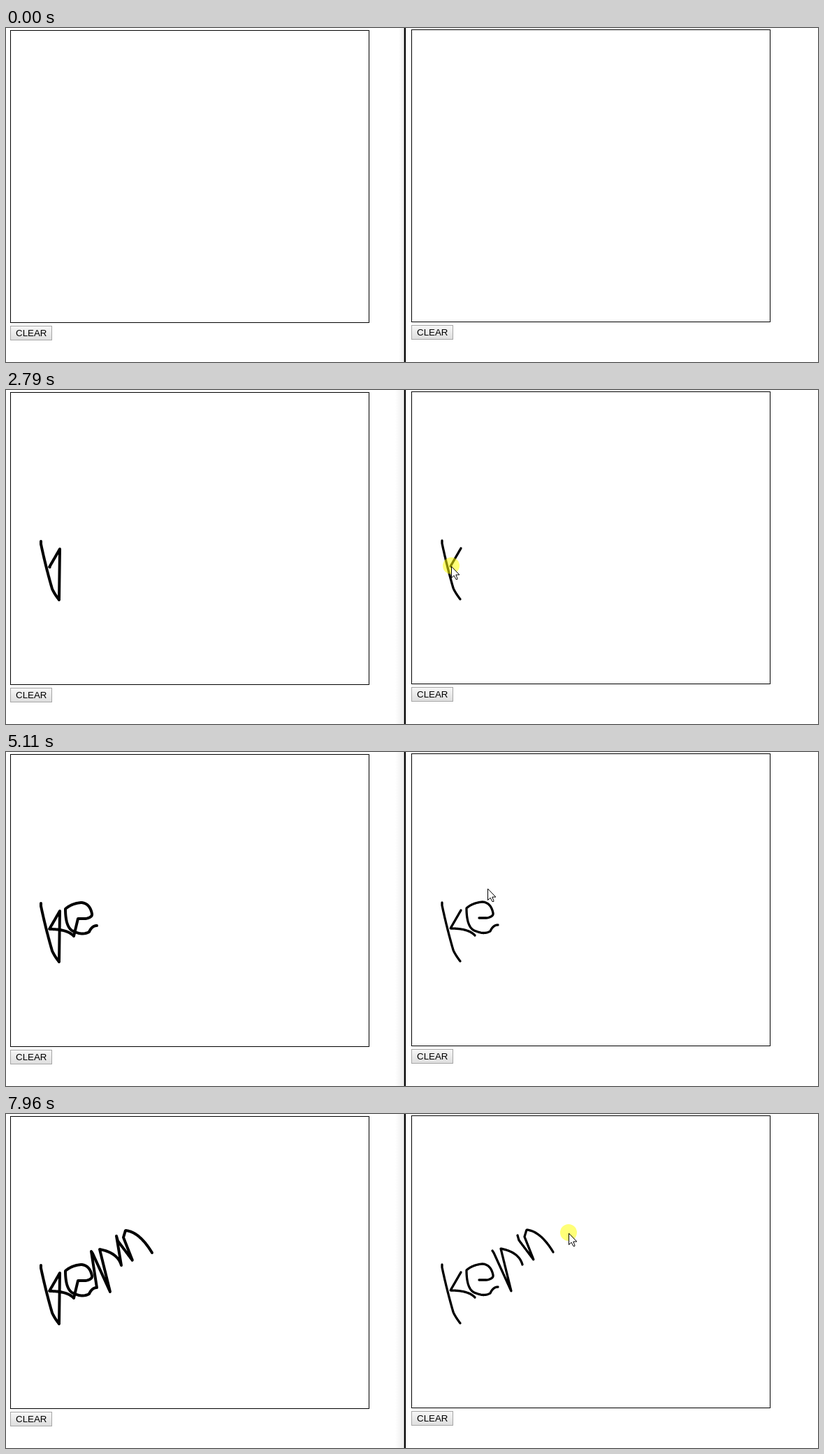
Animation, 1162 px wide and 479 px high, one loop 8 s. Source, as an HTML page with a canvas:

```html
<!DOCTYPE html>
<html lang="en">
<head>
<meta charset="utf-8">
<title>Shared sketch pad</title>
<style>
  html, body { margin: 0; width: 100%; height: 100%; overflow: hidden; background: #fff; }
  canvas { display: block; }
</style>
</head>
<body>
<canvas id="stage" width="1162" height="479"></canvas>
<script>
const ctx = document.getElementById('stage').getContext('2d');
const LOOP = 8000, ENTER = 320, TICK = 77.2;
const ACTIVATE = 1700, LAST_PRESS = 7930;
const SHIFT_X = -574, SHIFT_Y = 1;
const ARROW = new Path2D('M0 0V16L3.6 12.6L6.4 18H8.4V16.6L6.3 11.5H11Z');

// The pointer's life is a chain of legs: eased glides and steadily drawn strokes.
const legs = [];
let clock = ENTER, spot = { x: 763, y: 458 };

function leg(t1, end, at, pen = false) {
  legs.push({ t0: clock, t1, at, pen });
  clock = t1;
  spot = end;
}

function glide(t1, x, y) {
  const from = spot;
  leg(t1, { x, y }, p => {
    const e = p * p * (3 - 2 * p);
    return { x: from.x + (x - from.x) * e, y: from.y + (y - from.y) * e };
  });
}

function draw(t0, t1, d) {
  const path = document.createElementNS('http://www.w3.org/2000/svg', 'path');
  path.setAttribute('d', d);
  const length = path.getTotalLength(), n = Math.ceil(length);
  const pts = Array.from({ length: n + 1 }, (_, i) => path.getPointAtLength(length * i / n));
  glide(t0, pts[0].x, pts[0].y);
  leg(t1, pts[n], p => pts[Math.round(p * n)], pts);
}

glide(860, 687, 117);
glide(1175, 757, 195);
glide(1565, 624, 216);
draw(1705, 1965, 'M624 216V220Q631 253 640 284Q643 291 650 300');
glide(2300, 658, 245);
draw(2560, 3070, 'M651 227L636 253Q662 253 671 263');
glide(3175, 670, 281);
draw(3640, 4600, 'M677 238H688Q698 236 697 231Q694 216 682 215Q668 216 659 224' +
                 'Q659 254 673 257Q684 262 693 257Q697 248 704 248');
glide(5100, 689, 196);
draw(5270, 5900, 'M696 196l2 3 25 55-15-61q26 5 31 23');
glide(6415, 718, 158);
draw(6720, 7640, 'M732 174l2 7 21 28-13-33 3-10q20 2 38 32');
glide(7880, 805, 171);

const progress = ({ t0, t1 }, t) => Math.min(1, (t - t0) / (t1 - t0));

const strokesAt = t => legs
  .filter(l => l.pen && l.t0 <= t)
  .map(l => l.pen.slice(0, Math.round(progress(l, t) * (l.pen.length - 1)) + 1));

function polyline(pts, width) {
  if (!pts.length) return;
  ctx.lineWidth = width;
  ctx.beginPath();
  ctx.moveTo(pts[0].x, pts[0].y);
  for (const p of pts) ctx.lineTo(p.x, p.y);
  ctx.stroke();
}

function button(x, y) {
  const g = ctx.createLinearGradient(0, y, 0, y + 21);
  g.addColorStop(0, '#f8f8f8');
  g.addColorStop(1, '#dddddd');
  ctx.fillStyle = g;
  ctx.fillRect(x, y, 60, 21);
  ctx.strokeStyle = '#a6a6a6';
  ctx.strokeRect(x + 0.5, y + 0.5, 59, 20);
  ctx.fillStyle = '#000';
  ctx.font = '13.333px "Liberation Sans", Arial, sans-serif';
  ctx.fillText('CLEAR', x + 8, y + 15);
}

function pad(x, y) {
  ctx.lineWidth = 1;
  ctx.strokeStyle = '#000';
  ctx.strokeRect(x + 0.5, y + 0.5, 513, 419);
  button(x, y + 424);
}

function divider(active) {
  const w = active ? 13 : 8;
  const g = ctx.createLinearGradient(570 - w, 0, 570, 0);
  g.addColorStop(0, 'rgba(0,0,0,0)');
  g.addColorStop(1, 'rgba(0,0,0,0.08)');
  ctx.fillStyle = g;
  ctx.fillRect(570 - w, 0, w, 479);
  ctx.fillStyle = '#000';
  ctx.fillRect(569.7, 0, 2.3, 479);
}

// The right pad keeps strokes apart; the left one joins them into a single path.
function ink(t) {
  const strokes = strokesAt(t);
  ctx.strokeStyle = '#000';
  ctx.lineCap = ctx.lineJoin = 'round';
  for (const s of strokes) polyline(s, 3.3);
  ctx.save();
  ctx.translate(SHIFT_X, SHIFT_Y);
  polyline(strokes.flat(), 4);
  ctx.restore();
}

function pointer(t) {
  const now = legs.filter(l => l.t0 <= t).pop();
  const p = now.at(progress(now, t));
  const x = Math.round(p.x), y = Math.round(p.y);
  if (now.pen || t >= LAST_PRESS) {
    ctx.fillStyle = 'rgba(255,255,0,0.53)';
    ctx.beginPath();
    ctx.arc(x, y - 1, 12, 0, Math.PI * 2);
    ctx.fill();
  }
  ctx.save();
  ctx.translate(x + 0.5, y + 0.5);
  ctx.fillStyle = '#fff';
  ctx.fill(ARROW);
  ctx.strokeStyle = '#000';
  ctx.lineWidth = 1;
  ctx.stroke(ARROW);
  ctx.restore();
}

function render(t) {
  ctx.fillStyle = '#fff';
  ctx.fillRect(0, 0, 1162, 479);
  ctx.lineJoin = 'miter';
  divider(t >= ACTIVATE);
  pad(6, 3);
  pad(580, 2);
  if (t < ENTER) return;
  ink(t);
  pointer(t);
}

const snap = t => ENTER + Math.floor((t - ENTER) / TICK + 0.1) * TICK;

const start = performance.now();
function frame() {
  render(snap((performance.now() - start) % LOOP));
  requestAnimationFrame(frame);
}
frame();
</script>
</body>
</html>
```
